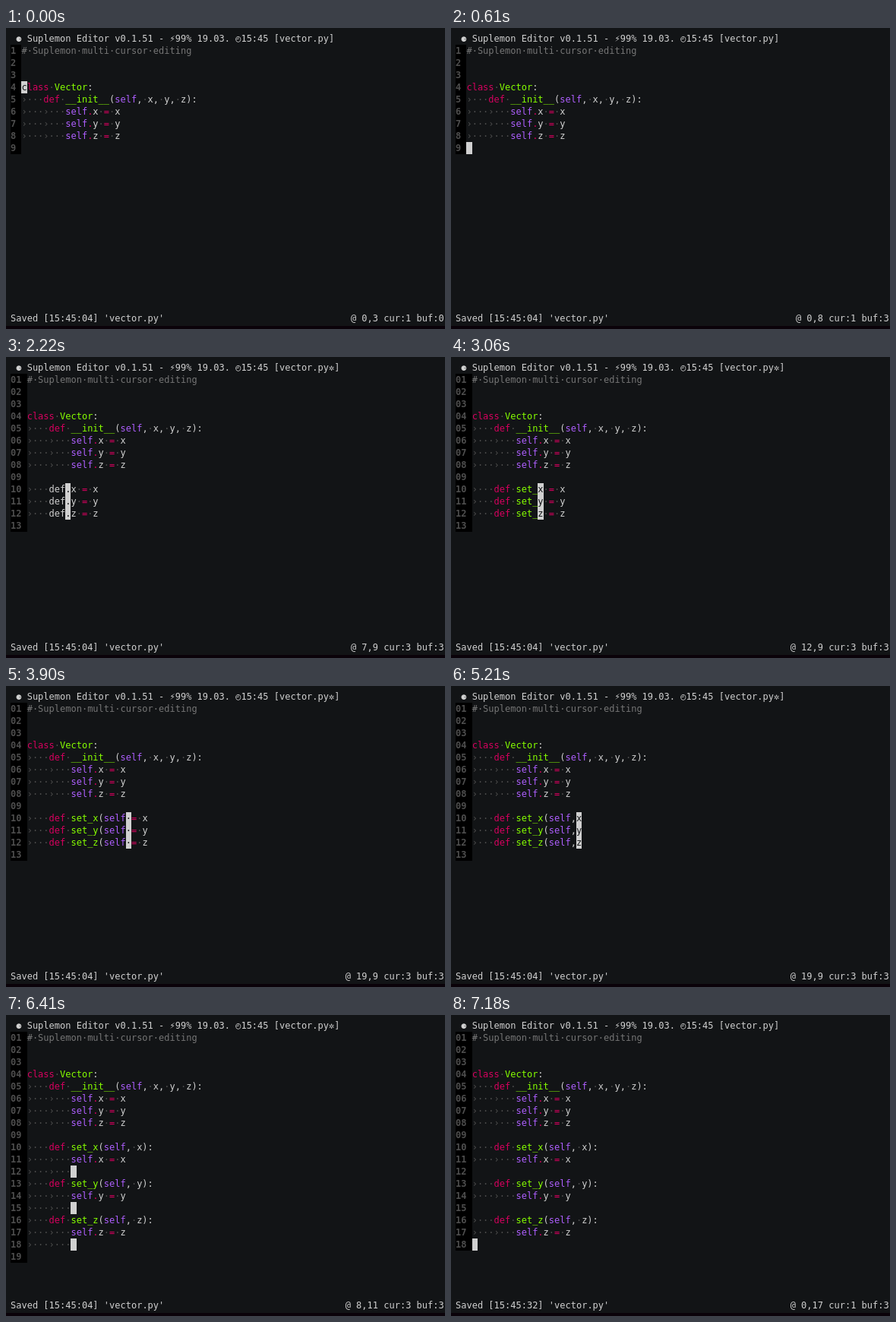
Write an HTML page that moves like this. It is 578 by 396 pixels and loops after 7930 ms.

```html
<!DOCTYPE html>
<html lang="en">
<head>
<meta charset="utf-8">
<title>Multi cursor editing</title>
<style>
  html, body { margin: 0; width: 100%; height: 100%; overflow: hidden; background: #121416; }
  svg { display: block; }
  text { font: 12px "DejaVu Sans Mono", "DejaVu Sans", monospace; white-space: pre; }
  rect { shape-rendering: crispEdges; }
</style>
</head>
<body>
<svg id="stage" width="578" height="396" viewBox="0 0 578 396"></svg>
<script>
const LOOP = 7930;
const LEFT = 6, TOP = 6, CELL = 7.224, ROW = 16, COLS = 79, STATUS_ROW = 23;
const color = {
  text: '#d0d0d0', dim: '#4e4e4e', comment: '#767676', keyword: '#d7005f',
  name: '#87ff00', self: '#af5fff', number: '#4e4e4e', inverse: '#121416'
};

// Later rules override earlier ones.
const rules = [
  [/[.=]/g, color.keyword],
  [/ /g, color.dim],
  [/\bself\b/g, color.self],
  [/\b(class|def)(?= )/g, color.keyword],
  [/(?<=\b(class|def) )\w+/g, color.name],
  [/^#.*/g, color.comment]
];

const axes = ['x', 'y', 'z'];
const editor = {
  lines: ['# Suplemon multi cursor editing', '', '', 'class Vector:',
    '    def __init__(self, x, y, z):',
    ...axes.map(a => `        self.${a} = ${a}`), ''],
  cursors: [{ x: 0, y: 3 }],
  buffer: [], dirty: false, saved: '15:45:04', lead: 0
};

function splice(count, insert = '') {
  editor.cursors.forEach((c, i) => {
    const added = Array.isArray(insert) ? insert[i] : insert;
    const line = editor.lines[c.y];
    editor.lines[c.y] = line.slice(0, c.x) + added + line.slice(c.x + count);
    c.x += added.length;
  });
  editor.dirty = true;
}

const move = (dx, dy) => () => editor.cursors.forEach(c => { c.x += dx; c.y += dy; });
const type = s => () => { editor.lead = 0; splice(0, s); };
const erase = () => splice(1);
const back = n => () => { move(-n, 0)(); splice(n); };
const addCursor = () => {
  const last = editor.cursors.at(-1);
  editor.cursors.push({ x: last.x, y: last.y + 1 });
};
const single = () => { editor.cursors = editor.cursors.slice(-1); };
const copy = () => { editor.buffer = editor.cursors.map(c => editor.lines[c.y]); };
const paste = () => {
  const c = editor.cursors[0];
  editor.lines.splice(c.y, 0, ...editor.buffer);
  c.y += editor.buffer.length;
};
const enter = indent => () => {
  editor.cursors.forEach((c, i) => {
    c.y += i + 1;
    c.x = indent;
    editor.lines.splice(c.y, 0, ' '.repeat(indent));
  });
  editor.dirty = true;
};
const dropLine = () => editor.lines.pop();
const save = () => { editor.dirty = false; editor.saved = '15:45:32'; };

const script = [
  [0, () => {}],
  [160, move(0, 1)], [220, move(0, 1)], [280, addCursor], [340, addCursor],
  [420, copy], [500, single], [600, move(0, 1)], [720, enter(0)], [910, paste],
  [1130, move(0, -1)], [1160, move(0, -1)], [1190, move(0, -1)], [1230, move(8, 0)],
  [1280, addCursor], [1360, addCursor],
  [1420, erase], [1480, erase], [1540, erase], [1600, erase], [1660, back(4)],
  [1840, type('d')], [1970, type('e')], [2200, type('f')],
  [2470, type(' ')], [2540, type('s')], [2610, type('e')], [2680, type('t')],
  [2890, type('_')], [3060, erase], [3080, move(1, 0)],
  [3260, type('(')], [3310, type('s')], [3360, type('e')], [3415, type('l')], [3470, type('f')],
  [3900, () => { editor.lead = 1; }], [3920, type(',')],
  [4400, erase], [4690, erase], [5210, erase],
  [5370, type(' ')], [5430, move(1, 0)], [5490, type(')')], [5550, type(':')], [5610, enter(8)],
  [5690, type('s')], [5770, type('e')], [5850, type('l')], [5920, type('f')], [5990, type('.')],
  [6050, type(axes)], [6105, type(' ')], [6160, type('=')], [6200, type(' ')], [6260, type(axes)],
  [6410, enter(8)], [6500, back(8)], [6710, single], [6910, dropLine], [7180, save]
];

const states = script.map(([time, action]) => {
  action();
  return { time, ...structuredClone(editor) };
});

const escape = s => s.replace(/&/g, '&amp;').replace(/</g, '&lt;');
const atCol = col => LEFT + col * CELL;
const text = (col, row, s, fill = color.text, extra = '') =>
  `<text x="${atCol(col).toFixed(2)}" y="${TOP + row * ROW + 12}" fill="${fill}" ${extra}>${escape(s)}</text>`;
const box = (col, row, cols, rows, fill) =>
  `<rect x="${atCol(col).toFixed(2)}" y="${TOP + row * ROW}" width="${cols * CELL}" height="${rows * ROW}" fill="${fill}"/>`;

function showSpaces(line) {
  const indent = line.search(/\S|$/);
  return [...line].map((ch, i) => ch !== ' ' ? ch : i < indent && i % 4 === 0 ? '›' : '·').join('');
}

function drawLine(line, col, row, cursorCols) {
  const fills = Array(line.length).fill(color.text);
  for (const [pattern, fill] of rules)
    for (const m of line.matchAll(pattern)) fills.fill(fill, m.index, m.index + m[0].length);
  cursorCols.forEach(x => { if (x < line.length) fills[x] = color.inverse; });

  const shown = showSpaces(line);
  let out = cursorCols.map(x => box(col + x, row, 1, 1, color.text)).join('');
  for (let start = 0, end; start < line.length; start = end) {
    end = start + 1;
    while (end < line.length && fills[end] === fills[start]) end++;
    out += text(col + start, row, shown.slice(start, end), fills[start]);
  }
  return out;
}

function drawTitle(dirty) {
  return text(1, 0, '⚈') + text(3, 0, 'Suplemon Editor v0.1.51 -') + text(29, 0, '⚡\uFE0E') +
    text(30, 0, '99% 19.03.') + text(41, 0, '◴') + text(42, 0, '15:45 [vector.py') +
    (dirty ? text(58, 0, '✲') : '') + text(dirty ? 59 : 58, 0, ']');
}

function draw({ lines, cursors, buffer, dirty, saved, lead }) {
  const digits = String(lines.length).length;
  const gutter = digits + 1;
  const status = `@ ${cursors[0].x + lead},${cursors[0].y} cur:${cursors.length} buf:${buffer.length}`;
  const body = lines.map((line, y) =>
    text(0, y + 1, String(y + 1).padStart(digits, '0'), color.number, 'font-weight="bold" style="font-weight:bold"') +
    drawLine(line, gutter, y + 1, cursors.filter(c => c.y === y).map(c => c.x)));
  return '<rect width="578" height="396" fill="#121416"/>' +
    '<rect y="392" width="578" height="4" fill="#0a0209"/>' +
    drawTitle(dirty) + box(0, 1, gutter, lines.length, '#000') + body.join('') +
    text(0, STATUS_ROW, `Saved [${saved}] 'vector.py'`) +
    text(COLS - status.length, STATUS_ROW, status);
}

const stage = document.getElementById('stage');
let current;
function render(now) {
  const t = now % LOOP;
  const state = states.findLast(s => s.time <= t);
  if (state !== current) {
    current = state;
    stage.innerHTML = draw(state);
  }
}

const started = performance.now();
function tick() {
  render(performance.now() - started);
  requestAnimationFrame(tick);
}
tick();
</script>
</body>
</html>
```
